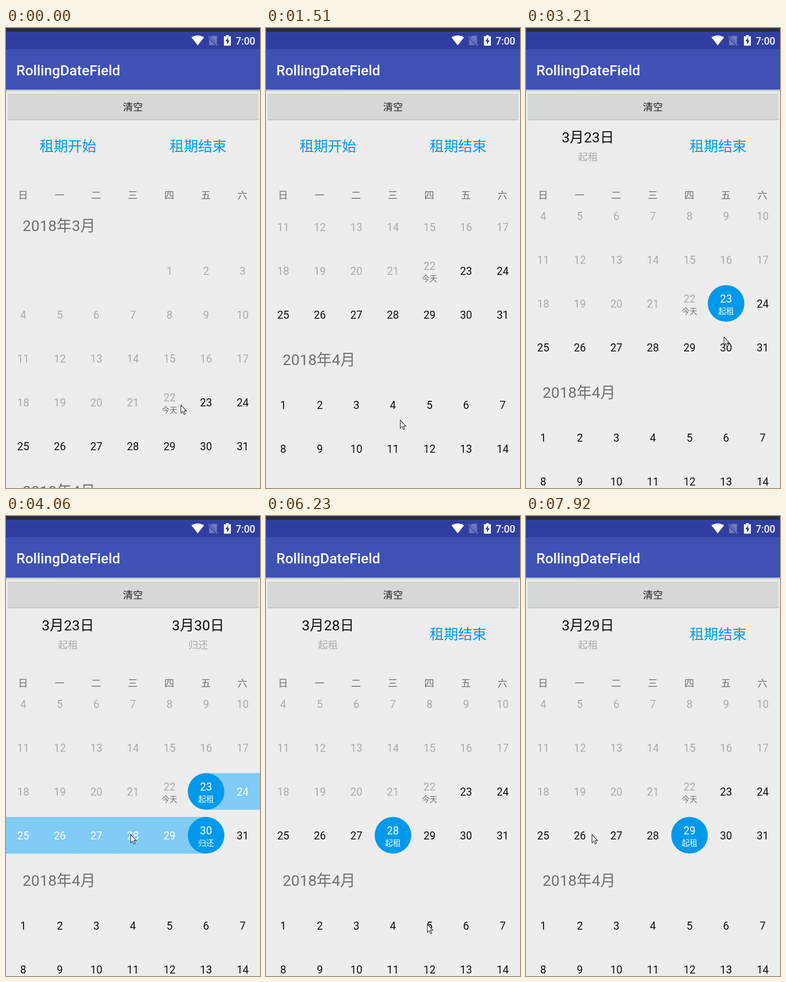
Recreate the animation shown at these times as an HTML page. Size 506 by 913 pixels, loop 8000 ms.

```html
<!DOCTYPE html>
<html lang="zh-CN">
<head>
<meta charset="utf-8">
<title>Date range picker</title>
<style>
  html, body { margin: 0; width: 100%; height: 100%; overflow: hidden; background: #ededed; }
  svg { display: block; width: 100%; height: 100%; }
  text { font-family: Roboto, "Noto Sans CJK SC", "Noto Sans CJK", "Noto Sans CJK JP", sans-serif; }
  .mid { text-anchor: middle; }
  .medium { font-weight: 500; }
</style>
</head>
<body>
<svg viewBox="0 0 506 913">
  <defs>
    <linearGradient id="shade" x2="0" y2="1">
      <stop stop-color="#aeb0b4"/><stop offset="1" stop-color="#ededed"/>
    </linearGradient>
    <clipPath id="listArea"><rect y="344" width="506" height="569"/></clipPath>
  </defs>
  <rect width="506" height="913" fill="#ededed"/>

  <rect width="506" height="7" fill="#2a303c"/>
  <rect y="6" width="506" height="1" fill="#1d2333"/>
  <rect y="7" width="506" height="35" fill="#303f9f"/>
  <rect y="42" width="506" height="80" fill="#3f51b5"/>
  <rect y="122" width="506" height="5" fill="url(#shade)"/>

  <path d="M369.5 18.5Q382 11 394.5 18.5L382 34.5Z" fill="#fff"/>
  <path d="M410 15.5H420.5V34H404.5V21Z" fill="#6c77bc"/>
  <path d="M403.5 17L421 35" stroke="#303f9f" stroke-width="4"/>
  <path d="M403.5 16.5L421.5 34.5" stroke="#8790c8" stroke-width="1.6"/>
  <path d="M438.5 14H443.5V16.5H448V35H434V16.5H438.5Z" fill="#fff"/>
  <path d="M442.5 18.5L437 26.5H440.3V32.5L445.5 24.5H442.5Z" fill="#303f9f"/>
  <text class="medium" x="457.5" y="33" font-size="19.8" fill="#fff">7:00</text>
  <text class="medium" x="20.5" y="93.5" font-size="28.3" fill="#fff">RollingDateField</text>

  <rect x="3" y="131" width="500" height="52" rx="3" fill="#b9bbba"/>
  <rect x="3" y="130" width="500" height="51.5" rx="3" fill="#d6d8d7"/>
  <text class="mid medium" x="253" y="164" font-size="19.8" fill="#222">清空</text>

  <g id="header"></g>
  <g id="weekdays"></g>
  <g clip-path="url(#listArea)"><g id="list"></g></g>
  <path id="cursor" d="M.5 .5V16.5L4.2 13.1L6.7 18.9L9.2 17.8L6.7 12.1H11.5Z"
        fill="#fff" stroke="#23232f" stroke-width="1.1"/>
</svg>
<script>
const LOOP = 8000, REFRESH = 140, GLIDE = 0.6;
const CELL = 72.86, ROW = 87, MONTH_HEIGHT = 526.6, REST_SCROLL = 196;
const BLUE = '#0099eb', BAND = '#81cbf5', GRAY = '#aaa', DIM = '#707070', INK = '#111';
const TODAY = 22, MARCH_DAYS = 31, LAST_DAY = 61;

const byId = id => document.getElementById(id);
const columnX = col => 34.3 + CELL * col;
const isApril = day => day > MARCH_DAYS;
const dayNumber = day => isApril(day) ? day - MARCH_DAYS : day;
const label = (x, y, size, fill, str, cls = 'mid') =>
  `<text class="${cls}" x="${x}" y="${y}" font-size="${size}" fill="${fill}">${str}</text>`;

// Days are counted from March 1, 2018, a Thursday
function dayCenter(day) {
  const slot = dayNumber(day) - 1 + (isApril(day) ? 0 : 4);
  return {
    x: columnX(slot % 7),
    y: 481.7 + ROW * Math.floor(slot / 7) + (isApril(day) ? MONTH_HEIGHT : 0)
  };
}

function tap(at, day) {
  const { x, y } = dayCenter(day);
  return { at, day, x: x - 5, y: y - REST_SCROLL - 2 };
}

// Where the pointer has to be and when; "grab" drags the list until the next stop
const stops = [
  { at: 0, x: 348, y: 748 },
  { at: 420, x: 300, y: 800, grab: true },
  { at: 1090, x: 275, y: 539 },
  { at: 1510, x: 267, y: 778, grab: true },
  { at: 1950, x: 275, y: 843 },
  tap(2820, 23), tap(3490, 30), tap(4440, 28), tap(4860, 29),
  tap(5570, 28), tap(6510, 36), tap(7350, 29),
  { at: 8300, x: 131, y: 632 }
];

// The pointer glides early in each leg, then rests; the screen refreshes in ticks
function pointerOn(leg, t) {
  const a = stops[leg], b = stops[leg + 1];
  const elapsed = Math.floor((t - a.at) / REFRESH) * REFRESH;
  const u = Math.min(1, elapsed / (GLIDE * (b.at - a.at)));
  const eased = u * u * (3 - 2 * u);
  return { x: a.x + (b.x - a.x) * eased, y: a.y + (b.y - a.y) * eased };
}

function stateAt(t) {
  let leg = 0, scroll = 0, start, end;
  while (stops[leg + 1].at <= t) leg++;
  const pointer = pointerOn(leg, t);
  for (let i = 0; i <= leg; i++) {
    const { grab, day, y } = stops[i];
    if (grab) scroll += y - (i < leg ? stops[i + 1].y : pointer.y);
    if (!day) continue;
    if (start && !end && day > start) end = day;
    else [start, end] = [day];
  }
  return { pointer, scroll, start, end };
}

function headerHalf(x, day, prompt, caption) {
  if (!day) return label(x, 245, 28.3, BLUE, prompt);
  const date = `${isApril(day) ? 4 : 3}月${dayNumber(day)}日`;
  return label(x, 227, 28.3, INK, date) + label(x, 263, 19.8, GRAY, caption);
}

function dayCell(day, start, end) {
  const { x, y } = dayCenter(day);
  const isEdge = day === start || day === end;
  const inRange = end && day >= start && day <= end;
  const caption = day === start ? '起租' : day === end ? '归还' : day === TODAY ? '今天' : '';
  let out = '';
  if (inRange) {
    const left = day === start ? x : x - CELL / 2 - .2;
    const right = day === end ? x : x + CELL / 2 + .2;
    out += `<rect x="${left}" y="${y - 36.4}" width="${right - left}" height="72.8" fill="${BAND}"/>`;
  }
  if (isEdge) out += `<circle cx="${x}" cy="${y}" r="36.4" fill="${BLUE}"/>`;
  const color = isEdge || inRange ? '#fff' : day <= TODAY ? GRAY : INK;
  out += label(x, y + (caption ? -1.7 : 8.5), 21.4, color, dayNumber(day));
  if (caption) out += label(x, y + 21.3, 15.6, isEdge ? '#fff' : DIM, caption);
  return out;
}

function showRange(start, end) {
  byId('header').innerHTML =
    headerHalf(123.3, start, '租期开始', '起租') + headerHalf(382.7, end, '租期结束', '归还');
  let list = label(33, 403, 30.2, DIM, '2018年3月', '') +
             label(33, 403 + MONTH_HEIGHT, 30.2, DIM, '2018年4月', '');
  for (let day = 1; day <= LAST_DAY; day++) list += dayCell(day, start, end);
  byId('list').innerHTML = list;
}

const place = (id, x, y) =>
  byId(id).setAttribute('transform', `translate(${Math.round(x)} ${Math.round(y)})`);

byId('weekdays').innerHTML =
  [...'日一二三四五六'].map((name, i) => label(columnX(i) - .5, 339, 19.8, DIM, name)).join('');

let shownRange;
function draw(now) {
  const { pointer, scroll, start, end } = stateAt(now % LOOP);
  const range = `${start}-${end}`;
  if (range !== shownRange) showRange(start, end);
  shownRange = range;
  place('list', 0, -scroll);
  place('cursor', pointer.x, pointer.y);
  requestAnimationFrame(draw);
}
draw(performance.now());
</script>
</body>
</html>
```
